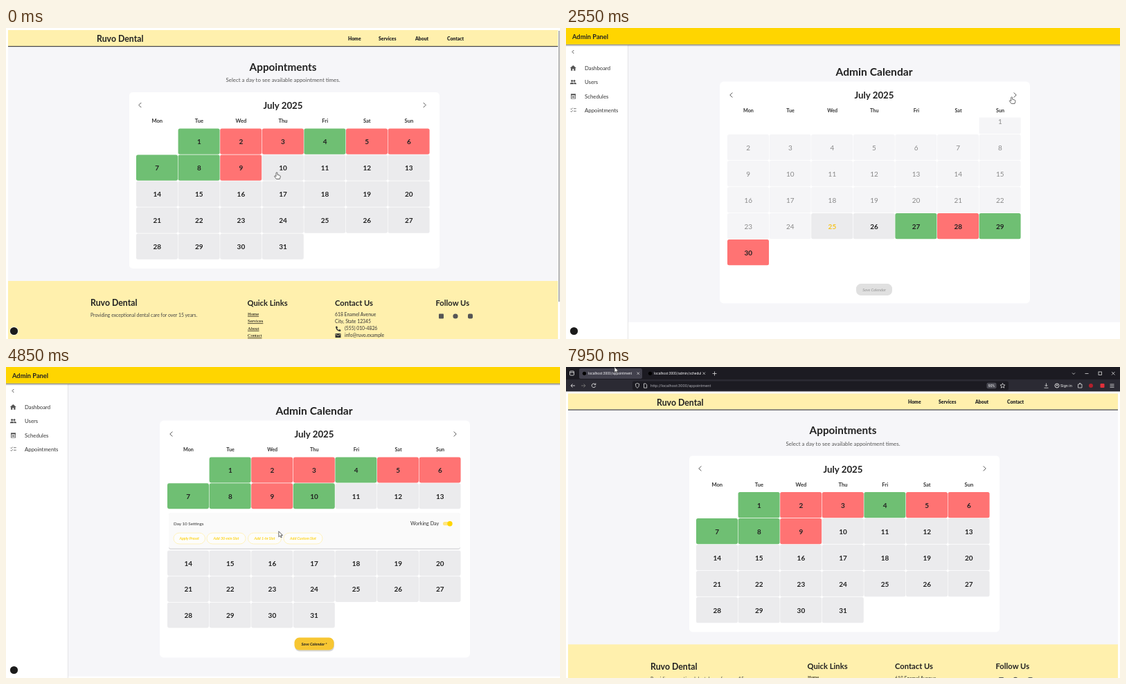
Write an HTML page that moves like this. It is 800 px wide and 450 px high and loops after 8000 ms.

```html
<!DOCTYPE html>
<html lang="en">
<head>
<meta charset="utf-8">
<title>Appointment calendar</title>
<style>
html, body { margin: 0; width: 100%; height: 100%; overflow: hidden; background: #fff; }
svg { display: block; width: 100vw; height: 100vh; font-family: Lato, "Open Sans", sans-serif; }
text { white-space: pre; }
</style>
</head>
<body>
<svg id="stage" viewBox="0 0 800 450"></svg>
<script>
const LOOP = 8000, ROW = 38, COL = 60.6, TOP = 130.6, BAR = 35.4;
const INK = '#222', GREEN = '#6fbf73', RED = '#ff7373', GREY = '#ebebed', GOLD = '#ffd500';
const stage = document.getElementById('stage');

// ---------- drawing helpers ----------
function set(node, attrs) {
  for (const k in attrs) node.setAttribute(k, attrs[k]);
  return node;
}
function add(parent, tag, attrs) {
  const node = document.createElementNS('http://www.w3.org/2000/svg', tag);
  parent.appendChild(set(node, attrs));
  return node;
}
const group = (p, attrs) => add(p, 'g', attrs);
const box = (p, x, y, width, height, fill, rx = 0, more) =>
  add(p, 'rect', { x, y, width, height, fill, rx, ...more });
const dot = (p, cx, cy, r, fill) => add(p, 'circle', { cx, cy, r, fill });
const line = (p, d, stroke = '#444', width = 1) =>
  add(p, 'path', { d, stroke, fill: 'none', 'stroke-width': width });
const shape = (p, d, fill = '#555') => add(p, 'path', { d, fill, 'fill-rule': 'evenodd' });
function label(p, str, x, y, size, more) {
  const node = add(p, 'text', { x, y: y + size * 0.36, 'font-size': size, fill: INK, ...more });
  node.textContent = str;
  return node;
}
const bold = { 'font-weight': 700 };
const mid = { 'text-anchor': 'middle' };
const show = (node, on) => node.setAttribute('visibility', on ? 'inherit' : 'hidden');
const move = (node, x, y) => node.setAttribute('transform', `translate(${x} ${y})`);
function clip(id, x, y, width, height) {
  return box(add(stage, 'clipPath', { id }), x, y, width, height, '#000');
}

// ---------- calendar ----------
function chevrons(p, left, right, y) {
  line(p, `M${left + 1.8} ${y - 3.5}l-3.5 3.5 3.5 3.5M${right - 1.8} ${y - 3.5}l3.5 3.5-3.5 3.5`, '#555', 1);
}
function weekdays(p, x, y, size) {
  ['Mon', 'Tue', 'Wed', 'Thu', 'Fri', 'Sat', 'Sun'].forEach((d, i) =>
    label(p, d, x + 30 + COL * i, y, size, { ...mid, ...bold, fill: '#333' }));
}
function days(p, x, first, count, style) {
  const rows = [], tiles = [];
  for (let d = 1; d <= count; d++) {
    const slot = first + d - 1, r = Math.floor(slot / 7), cx = x + slot % 7 * COL;
    rows[r] = rows[r] || group(p);
    const [fill, ink, weight] = style(d);
    tiles[d] = box(rows[r], cx - .6, r * ROW, 60, 37.2, fill, 2.5);
    label(rows[r], d, cx + 29.6, r * ROW + 18.9, 10, { ...mid, fill: ink, 'font-weight': weight });
  }
  return { rows, tiles };
}
const july = d => [[1, 4, 7, 8].includes(d) ? GREEN : d < 10 ? RED : GREY, INK, 700];
const june = d =>
  d < 25 ? ['#f5f5f7', '#8a8a8a', 400] :
  d == 25 ? [GREY, '#f5c422', 700] :
  [d == 26 ? GREY : d % 2 ? GREEN : RED, INK, 700];

// ---------- client page ----------
clip('mainClip', 0, 24, 800, 426);
const gridClip = clip('gridClip', 225, TOP - 1, 440, 300);
const view = group(stage);

const client = group(view);
box(client, 0, 0, 800, 450, '#fff');
box(client, 3, 3, 794, 447, '#f6f6f9');
box(client, 3, 3, 794, 23, '#fff0ad');
box(client, 3, 26, 794, 1.2, '#444');
label(client, 'Ruvo Dental', 131, 16, 12.3, bold);
[['Home', 494], ['Services', 538], ['About', 591], ['Contact', 637]].forEach(([s, x]) =>
  label(client, s, x, 15.5, 6.8, { 'font-weight': 900 }));
label(client, 'Appointments', 400, 56, 15.3, { ...bold, ...mid });
label(client, 'Select a day to see available appointment times.', 400, 75.5, 7.9, { ...mid, fill: '#555' });
box(client, 178, 93, 448, 255, '#fff', 5);
chevrons(client, 193.5, 604.5, 111.5);
label(client, 'July 2025', 400, 112.5, 13.3, { ...bold, ...mid });
weekdays(client, 188.3, 134.5, 7.6);
days(group(client, { transform: 'translate(0 145.6)' }), 188.6, 1, 31, july);

box(client, 3, 366, 794, 84, '#fff0ad');
label(client, 'Ruvo Dental', 122, 398, 12.3, bold);
label(client, 'Providing exceptional dental care for over 15 years.', 122, 416, 6.9, { fill: '#444' });
label(client, 'Quick Links', 348.5, 397.5, 11.2, bold);
['Home', 'Services', 'About', 'Contact'].forEach((s, i) =>
  label(client, s, 349, 413.5 + 10.5 * i, 6.6, {
    'font-family': '"Liberation Serif", serif', 'text-decoration': 'underline', fill: '#000' }));
label(client, 'Contact Us', 475, 397.5, 11.2, bold);
[['618 Enamel Avenue', 475, 415], ['City, State 12345', 475, 424.5],
 ['(555) 010-4826', 489, 434.7], ['info@ruvo.example', 489, 444.7]].forEach(([s, x, y]) =>
  label(client, s, x, y, 6.8, { fill: '#333' }));
shape(client, 'M476 432l2-.5 1 2-1 1q1 2 2.5 2.500l1-1 2 1-.5 2q-6.500 0-7-7z', '#333');
box(client, 475.5, 442, 8, 6, '#333', .6);
line(client, 'M476 443l3.500 2.300 3.500-2.300', '#fff0ad', .7);
label(client, 'Follow Us', 620.5, 397.5, 11.2, bold);
box(client, 625, 413.5, 7, 7, '#555', 1);
dot(client, 649, 417, 3.6, '#555');
box(client, 667, 413.5, 7, 7, '#555', 2);
const clientThumb = box(client, 798, 4, 1.2, 392, '#888');

// ---------- admin page ----------
const admin = group(view);
box(admin, 0, 0, 800, 450, '#fff');
const main = group(group(admin, { 'clip-path': 'url(#mainClip)' }));
const backdrop = box(main, 90, 0, 710, 400, '#f6f6f9');
const card = box(main, 222, 77.5, 448, 300, '#fff', 6);
label(main, 'Admin Calendar', 445, 63, 15.6, { ...bold, ...mid });
chevrons(main, 238.5, 648.5, 97);
const month = label(main, '', 445, 97.5, 13.3, { ...bold, ...mid });
weekdays(main, 233.5, 119.5, 7.2);

const clipped = group(main, { 'clip-path': 'url(#gridClip)' });
const juneGrid = group(clipped), julyGrid = group(clipped);
days(juneGrid, 233.6, 6, 30, june);
const julyDays = days(julyGrid, 233.6, 1, 31, july);

const panel = group(julyGrid);
const shade = box(panel, 235, 82, 421, 36, '#d9d9db', 3);
const sheet = box(panel, 235, 81, 421, 36, '#fafafa', 3);
label(panel, 'Day 10 Settings', 242, 97, 6.3, { fill: '#333' });
label(panel, 'Working Day', 584, 96.8, 7.2, { fill: '#333' });
const track = box(panel, 631, 94.3, 12, 5.2, '#999', 2.6);
const knob = dot(panel, 633, 97, 3.7, '#fff');

const actions = group(panel);
const pills = [['Apply Preset', 242, 45.5], ['Add 30-min Slot', 290, 56], ['Add 1-hr Slot', 349.5, 48], ['Add Custom Slot', 401, 56]]
  .map(([s, x, w]) => {
    const pill = box(actions, x, 110.5, w, 16, '#fdfdfb', 8, { stroke: '#fff0b0', 'stroke-width': .8 });
    label(actions, s, x + w / 2, 118.7, 5.4, { ...mid, ...bold, fill: '#fdd520', 'font-style': 'italic' });
    return pill;
  });

const hours = group(panel), fields = [];
const clock = h => String(h).padStart(2, '0') + ':00';
label(hours, 'Working Hours', 242, 137, 5.6);
for (let i = 0; i < 10; i++) {
  const y = 152.5 + 20.1 * i;
  fields.push(box(hours, 242, y - 8.5, 390.5, 17, '#fafafa', 1.5, { stroke: '#c4c4c4', 'stroke-width': .9 }));
  label(hours, `${clock(8 + i)} - ${clock(9 + i)}`, 247, y + .2, 8, { fill: '#222' });
  shape(hours, `M637.700 ${y - 3.2}h1.500v-.8h2.600v.8h1.500v1h-5.600zM638.100 ${y - 1.6}h4.800v5.200h-4.800z`, '#f4424e');
}

const save = group(main);
const saveShadow = box(save, -28, -8, 57, 19, '#d5d5d5', 7);
const savePill = box(save, -26, -8.5, 52, 17, '#e0e0e0', 7);
const saveText = label(save, '', 0, .3, 5.6, { ...mid, ...bold, 'font-style': 'italic' });

// fixed chrome of the admin page
box(admin, 0, 25, 89, 425, '#fff');
box(admin, 89, 25, .9, 425, '#e3e3e5');
line(admin, 'M11.300 32l-2.300 2.500 2.300 2.500', '#444', .9);
['Dashboard', 'Users', 'Schedules', 'Appointments'].forEach((s, i) =>
  label(admin, s, 27, 58.5 + 20.1 * i, 7.8, { fill: '#333' }));
shape(admin, 'M10.300 54l4.500 4h-1.300v3.800h-2.300v-2.700h-1.800v2.700h-2.300v-3.800h-1.300z');
dot(admin, 8.6, 76.5, 1.5, '#555');
dot(admin, 12, 76.5, 1.5, '#555');
shape(admin, 'M5.800 81.300q0-2.500 2.800-2.500t2.800 2.500zM11.800 81.300q.2-1.500-.8-2.400 4-.5 4 2.400z');
shape(admin, 'M7 95.300h7v7.200h-7zM7.800 97.500v4.200h5.400v-4.200z');
box(admin, 8.6, 99, 3.8, 1.5, '#555');
line(admin, 'M6.500 116.700l1.200 1.200 2-2.300M6.500 120.300l1.200 1.200 2-2.300M11 116.700h3.800M11 120.300h3.800', '#555', .8);
box(admin, 0, 23.6, 800, 1.4, '#000', 0, { opacity: .45 });
box(admin, 0, 25, 800, 1.6, '#000', 0, { opacity: .13 });
box(admin, 0, 0, 800, 23.6, GOLD);
label(admin, 'Admin Panel', 9, 13, 9.3, { 'font-weight': 700 });
const thumb = box(admin, 798, 3, 1.2, 293, '#888');

dot(view, 11.5, 438.5, 6.2, '#fff');
dot(view, 11.5, 438.5, 5.6, '#1b1b1b');

// ---------- browser bar ----------
const bar = group(stage, { 'font-family': 'Roboto, sans-serif' });
box(bar, 0, 0, 800, BAR, '#2b2a33');
box(bar, 0, 0, 800, 18, '#1c1b22');
box(bar, 5.5, 6, 6, 6, 'none', 1, { stroke: '#ddd', 'stroke-width': .9 });
line(bar, 'M6 8h5', '#ddd', .9);
const tabs = [[19, 'localhost:3000/appointment'], [114, 'localhost:3000/admin/schedul']].map(([x, s]) => {
  const back = box(bar, x, 2, 91, 15, '#42414d', 2.5);
  dot(bar, x + 7.5, 9.3, 2.6, '#000');
  label(bar, s, x + 13, 9.3, 5, { fill: '#f2f2f4' });
  line(bar, `M${x + 83.5} 7.500l3.500 3.500m0-3.500l-3.500 3.500`, '#ddd', .7);
  return back;
});
line(bar, 'M214.500 6.500v6m-3-3h6M731 8.500l2 2 2-2M749.500 9.500h5M788 7l4.500 4.500m0-4.500l-4.500 4.500', '#ddd', .8);
box(bar, 769, 7, 4.5, 4.5, 'none', 0, { stroke: '#ddd', 'stroke-width': .8 });
line(bar, 'M13 27h-6m2.500-2.500l-2.500 2.500 2.500 2.500', '#ddd', .9);
line(bar, 'M22 27h6m-2.500-2.500l2.500 2.500-2.500 2.500', '#777', .9);
line(bar, 'M42.300 25.200a2.800 2.800 0 1 0 .4 2.400M42.800 23.500v2.200h-2.200', '#ddd', .9);
box(bar, 96, 20.5, 543, 13, '#1c1b22', 2.5);
line(bar, 'M100.300 24.500l2.700-1 2.700 1q0 4.500-2.700 6-2.700-1.500-2.700-6zM112.500 24h2.500l1.700 1.700v4.500h-4.200z', '#ddd', .8);
const address = label(bar, '', 122, 27.2, 5.7, { fill: '#a9a9b0' });
box(bar, 607.5, 22.8, 14, 8.5, '#4a4a53', 2);
label(bar, '90%', 614.5, 27.1, 5, { ...mid, fill: '#fff' });
line(bar, 'M630.500 23.500l1 2.300 2.500.2-1.900 1.700.6 2.500-2.200-1.400-2.200 1.400.6-2.500-1.900-1.700 2.500-.2z', '#ddd', .8);
line(bar, 'M693.500 23.500v4.500m-2-2l2 2 2-2M690.500 30.200h6M739.500 25h2v-1.500h1.500v1.500h2v5h-5.500zM785.500 25h6m-6 2.200h6m-6 2.200h6', '#ddd', .8);
dot(bar, 709, 27, 3, 'none').setAttribute('stroke', '#ddd');
dot(bar, 709, 26.5, 1.1, '#ddd');
label(bar, 'Sign in', 714, 27.2, 5.6, { fill: '#eee' });
dot(bar, 758, 27, 3, '#b3202c');
box(bar, 771.5, 24, 6, 6, '#e0303a', 1);

// ---------- pointer ----------
const outline = { fill: '#fff', stroke: '#444', 'stroke-width': .8, 'stroke-linejoin': 'round' };
const pointers = {
  arrow: add(stage, 'path', { d: 'M0 0V8L1.900 6.300 3.100 9 4.400 8.500 3.200 5.800H5.700Z', ...outline }),
  hand: add(stage, 'path', { d: 'M-1 .5Q0-.7 1 .5V3.300L4.400 4.300Q5.500 4.700 5.200 6.200L4.300 9.500H-.5L-3.400 5.800Q-3.300 4.500-2.100 5L-1 5.800Z', ...outline }),
  text: add(stage, 'path', { d: 'M-1.500 0h3M0 0v7M-1.500 7h3', fill: 'none', stroke: '#555', 'stroke-width': .7 })
};

// ---------- timeline ----------
const TAB_OUT = 1400, NEXT = 2450, ENTER = 2900, PICK = 3500, TOGGLE = 4300, PRESET = 5140, SAVED = 7100, TAB_BACK = 7850;
const GROW = 880;
const path = [
  [0, 391, 209], [50, 391, 209], [250, 402, 198], [450, 410, 210], [650, 388, 194], [800, 396, 185], [1050, 396, 185],
  [1250, 150, 5], [1400, 160, 8], [1500, 165, 10], [1700, 318, 128], [1850, 444, 308], [1900, 444, 308],
  [2200, 648, 95], [2500, 648, 95], [3050, 471, 298], [3400, 446, 187], [3600, 446, 187], [3950, 494, 221],
  [4200, 637, 222], [4500, 637, 224], [5080, 266, 245], [5200, 266, 245], [5550, 374, 262], [5750, 430, 290],
  [6350, 448, 372], [6550, 448, 372], [6750, 450, 428], [7380, 450, 428], [7700, 90, 3], [7900, 70, 0], [8000, 70, 0]
];
const kinds = [[0, 'hand'], [1080, 'arrow'], [2150, 'hand'], [3700, 'arrow'], [4150, 'hand'], [4550, 'arrow'],
  [5050, 'hand'], [5350, 'text'], [5900, 'arrow'], [6700, 'hand'], [7450, 'arrow']];
const barKeys = [[1150, 0], [1250, BAR], [1560, BAR], [1660, 0], [7620, 0], [7720, BAR]];
const scrollKeys = [[5760, 0], [6350, 199.5]];
const stages = [[PICK, 44], [TOGGLE, 60], [PRESET, 278.5]];

const clamp = v => Math.max(0, Math.min(1, v));
const smooth = p => p * p * (3 - 2 * p);
function key(t, table, i = 1) {
  if (t <= table[0][0]) return table[0][i];
  const n = table.findIndex(k => k[0] > t);
  if (n < 0) return table[table.length - 1][i];
  const a = table[n - 1], b = table[n];
  return a[i] + (b[i] - a[i]) * smooth((t - a[0]) / (b[0] - a[0]));
}
const left = (t, from, span) => (1 - clamp((t - from) / span)) ** 2;

function drawAdmin(t) {
  const entered = t >= ENTER - 50;
  let space = 0, stretch = 1;
  for (const [from, size] of stages) if (t >= from) {
    stretch = 1 - (size - space) / (5 * ROW + size) * left(t, from, GROW);
    space = size;
  }
  const height = entered ? 5 * ROW + space : 6 * ROW, end = TOP + height;
  const scroll = key(t, scrollKeys);
  move(main, 0, -scroll);
  set(backdrop, { height: end + 67 });
  set(card, { height: end + 40 - 77.5 });
  set(gridClip, { height: height + 1 });
  month.textContent = t < NEXT ? 'June 2025' : 'July 2025';

  const out = clamp((t - NEXT) / 400);
  show(juneGrid, !entered);
  move(juneGrid, 0, TOP - 6 * ROW * out * out);
  show(julyGrid, entered);
  const slide = 5 * ROW * left(t, ENTER, 470);
  set(julyGrid, { transform: `translate(0 ${TOP + slide}) scale(1 ${stretch})` });
  julyDays.rows.forEach((row, r) => move(row, 0, r > 1 ? space : 0));

  const on = t >= TOGGLE;
  const wide = t < TOGGLE ? 1 - .04 * left(t, PICK, GROW) : 1;
  set(julyDays.tiles[10], { fill: on ? GREEN : GREY });
  show(panel, space > 0);
  set(panel, { transform: `translate(${445 * (1 - wide)} 0) scale(${wide} 1)` });
  set(sheet, { height: Math.max(0, space - 8) });
  set(shade, { height: Math.max(0, space - 7.5) });
  set(track, { fill: on ? '#ffe680' : '#999' });
  set(knob, { cx: 633 + 8 * smooth(clamp((t - TOGGLE) / 150)), fill: on ? GOLD : '#fff' });
  show(actions, on);
  set(pills[0], { fill: t > 5050 && t < 5650 ? '#fff3c4' : '#fdfdfb' });
  show(hours, t >= PRESET);
  set(fields[0], { stroke: t > 5480 && t < 5640 ? '#666' : '#c4c4c4' });

  const dirty = on && t < SAVED;
  move(save, 445, end + 20);
  show(saveShadow, dirty);
  set(savePill, dirty ? { x: -28.5, y: -9, width: 57, height: 18, fill: '#f7c632' }
                      : { x: -26, y: -8.5, width: 52, height: 17, fill: '#e0e0e0' });
  set(saveText, { fill: dirty ? INK : '#a5a5a5' });
  saveText.textContent = dirty ? 'Save Calendar *' : 'Save Calendar';
  show(thumb, t >= PRESET);
  set(thumb, { y: 3 + scroll * .687 });
}

function draw(t) {
  const down = key(t, barKeys), onAdmin = t >= TAB_OUT && t < TAB_BACK;
  move(view, 0, down);
  move(bar, 0, down - BAR);
  show(bar, down > 0);
  show(client, !onAdmin);
  show(clientThumb, t < TAB_OUT);
  show(admin, onAdmin);
  set(tabs[0], { fill: onAdmin ? 'none' : '#42414d' });
  set(tabs[1], { fill: onAdmin ? '#42414d' : 'none' });
  address.textContent = 'http://localhost:3000/' + (onAdmin ? 'admin/schedules' : 'appointment');
  if (onAdmin) drawAdmin(t);

  const kind = kinds.filter(k => k[0] <= t).pop()[1];
  for (const k in pointers) show(pointers[k], k == kind);
  move(pointers[kind], key(t, path, 1), key(t, path, 2));
}

function tick() {
  draw(performance.now() % LOOP);
  requestAnimationFrame(tick);
}
tick();
</script>
</body>
</html>
```
